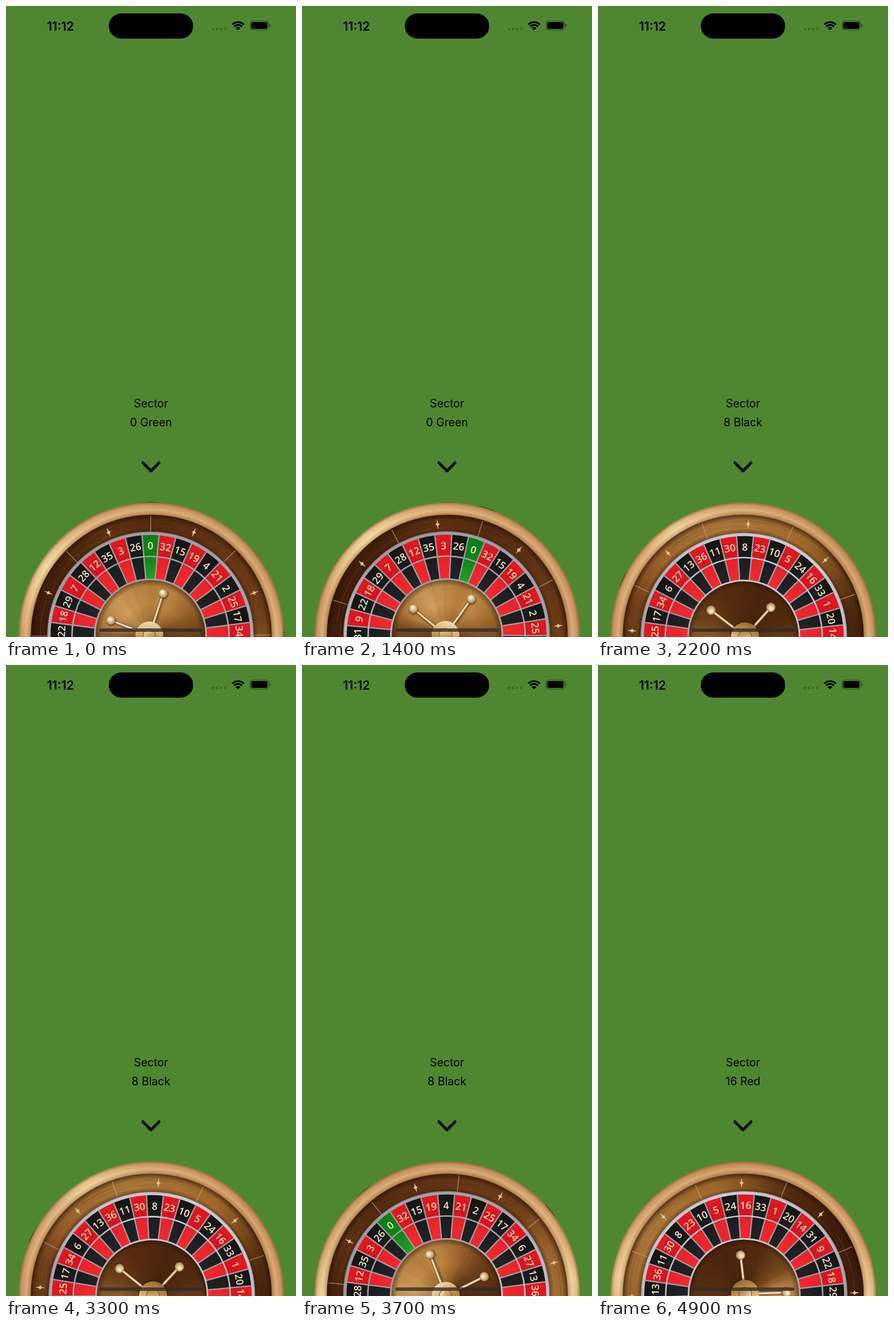
An HTML page with a canvas for the animation above (5 s loop, 508 px wide and 1102 px high).

```html
<!DOCTYPE html>
<html lang="en">
<head>
<meta charset="utf-8">
<title>Roulette</title>
<style>
  html, body { margin: 0; width: 100%; height: 100%; overflow: hidden; background: #4f8731; }
  canvas { display: block; width: 508px; height: 1102px; }
</style>
</head>
<body>
<canvas id="stage" width="508" height="1102"></canvas>
<script>
const ctx = document.getElementById('stage').getContext('2d');
const TAU = Math.PI * 2;
const LOOP = 5000, STEP = 100;
const CENTER = { x: 254.5, y: 1099.5 };
const ORDER = [0, 32, 15, 19, 4, 21, 2, 25, 17, 34, 6, 27, 13, 36, 11, 30, 8, 23, 10,
  5, 24, 16, 33, 1, 20, 14, 31, 9, 22, 18, 29, 7, 28, 12, 35, 3, 26];
const POCKET = TAU / ORDER.length;
const KNOBS = [[22, -73], [71.5, 17.2], [-21.5, 66], [-69.5, -26]];
const SPINS = [
  { start: 976, time: 950, from: 0, to: 925, label: '8 Black' },
  { start: 3280, time: 671, from: 205, to: 876.6, label: '16 Red' }
];

const rad = deg => deg * Math.PI / 180;

// cubic-bezier(.42, 0, .58, 1), solved by bisection
function easeInOut(x) {
  let lo = 0, hi = 1;
  for (let i = 0; i < 24; i++) {
    const s = (lo + hi) / 2, r = 1 - s;
    if (1.26 * r * r * s + 1.74 * r * s * s + s * s * s < x) lo = s; else hi = s;
  }
  return lo * lo * (3 - 2 * lo);
}

function stateAt(t) {
  let angle = 0, label = '0 Green';
  for (const s of SPINS) {
    if (t < s.start) break;
    const p = Math.min(1, (t - s.start) / s.time);
    angle = s.from + (s.to - s.from) * easeInOut(p);
    if (p === 1) label = s.label;
  }
  return { angle: rad(angle), label };
}

function addStops(g, stops) {
  stops.forEach(([at, color]) => g.addColorStop(at, color));
  return g;
}

// stops are given in degrees clockwise from the top
const conic = stops => addStops(ctx.createConicGradient(-Math.PI / 2, 0, 0),
  stops.map(([deg, color]) => [deg / 360, color]));
const radial = (x, y, r0, r1, stops) =>
  addStops(ctx.createRadialGradient(x, y, r0, x, y, r1), stops);

const paint = {
  rim: conic([[0, '#d2a06a'], [60, '#cf9a66'], [105, '#dcae78'], [122, '#f0d19a'], [150, '#d6a56e'],
    [200, '#cb955f'], [270, '#d5a36d'], [303, '#f5da a2'.replace(' ', '')], [330, '#ddb07a'], [360, '#d2a06a']]),
  rimShade: radial(0, 0, 209, 232.5, [[0, 'rgba(80,42,12,.7)'], [.16, 'rgba(120,70,30,.25)'],
    [.45, 'rgba(255,225,175,.22)'], [.75, 'rgba(150,95,50,.1)'], [1, 'rgba(110,65,25,.6)']]),
  wood: conic([[0, '#562c10'], [45, '#653615'], [80, '#713f18'], [102, '#97602a'], [145, '#ad7a3b'],
    [190, '#a0692b'], [212, '#764619'], [230, '#522b0e'], [265, '#3b1a09'], [310, '#48230c'],
    [335, '#5c3112'], [360, '#562c10']]),
  woodShade: radial(0, 0, 179, 211, [[0, 'rgba(30,12,2,.4)'], [.25, 'rgba(30,12,2,0)'],
    [.7, 'rgba(30,12,2,.05)'], [1, 'rgba(30,12,2,.6)']]),
  silver: conic([[0, '#a19ca1'], [80, '#aaa5aa'], [130, '#cac5cb'], [200, '#d0cbd2'],
    [260, '#bbb5bb'], [300, '#9f999e'], [360, '#a19ca1']]),
  red: radial(0, 0, 98, 176, [[0, '#f02a2e'], [.45, '#e8232a'], [.55, '#d8131d'], [1, '#e01922']]),
  black: radial(0, 0, 98, 176, [[0, '#222324'], [.5, '#1b1c1d'], [1, '#151515']]),
  green: radial(0, 0, 98, 176, [[0, '#24a02a'], [.5, '#118318'], [1, '#0f7d15']]),
  cone: conic([[0, '#b8823f'], [25, '#c18b48'], [55, '#a06a2f'], [85, '#70431a'], [120, '#5a2f12'],
    [180, '#4a240d'], [225, '#532b0f'], [262, '#7c4c20'], [280, '#b27d3f'], [315, '#cf9d5c'],
    [345, '#bf8a48'], [360, '#b8823f']]),
  coneShade: radial(0, 0, 20, 97, [[0, 'rgba(60,28,6,.25)'], [.45, 'rgba(60,28,6,0)'],
    [.85, 'rgba(50,22,4,.06)'], [1, 'rgba(40,16,2,.55)']]),
  hub: addStops(ctx.createLinearGradient(0, -25, 0, 25),
    [[0, '#f0dcb0'], [.35, '#dcb474'], [.65, '#bb8a48'], [1, '#9a6a32']]),
  cap: addStops(ctx.createLinearGradient(-6, -11, 6, 11),
    [[0, '#fff2cd'], [.4, '#d5ad6c'], [1, '#a87838']])
};

function random(seed) {
  return () => (seed = (seed * 16807) % 2147483647) / 2147483647;
}

function disc(x, y, r, fill) {
  ctx.beginPath();
  ctx.arc(x, y, r, 0, TAU);
  ctx.fillStyle = fill;
  ctx.fill();
}

function ring(inner, outer, fill) {
  ctx.beginPath();
  ctx.arc(0, 0, outer, 0, TAU);
  ctx.arc(0, 0, inner, 0, TAU, true);
  ctx.fillStyle = fill;
  ctx.fill();
}

function line(x1, y1, x2, y2, width, color) {
  ctx.beginPath();
  ctx.moveTo(x1, y1);
  ctx.lineTo(x2, y2);
  ctx.lineWidth = width;
  ctx.strokeStyle = color;
  ctx.stroke();
}

function pill(x, y, w, h, r, fill) {
  ctx.beginPath();
  ctx.roundRect(x, y, w, h, r);
  ctx.fillStyle = fill;
  ctx.fill();
}

function turned(angle, draw) {
  ctx.save();
  ctx.rotate(angle);
  draw();
  ctx.restore();
}

function grain() {
  const rnd = random(71);
  for (let i = 0; i < 46; i++) {
    const from = rnd() * TAU, r = 183 + rnd() * 25;
    ctx.beginPath();
    ctx.ellipse(0, 0, r, r + rnd() * 5 - 2.5, rnd() * TAU, from, from + .2 + rnd() * .4);
    ctx.lineWidth = .7 + rnd() * 1.2;
    ctx.strokeStyle = rnd() < .5 ? 'rgba(200,140,70,.1)' : 'rgba(40,16,2,.14)';
    ctx.stroke();
  }
}

function marker() {
  ctx.beginPath();
  ctx.moveTo(0, -204);
  ctx.lineTo(1.3, -197);
  ctx.lineTo(4, -195);
  ctx.lineTo(1.3, -193);
  ctx.lineTo(0, -186);
  ctx.lineTo(-1.3, -193);
  ctx.lineTo(-4, -195);
  ctx.lineTo(-1.3, -197);
  ctx.closePath();
  ctx.fillStyle = '#dcc096';
  ctx.fill();
}

function drawBowl() {
  // thin dark slivers beyond the rim
  for (const a of [0, 90]) turned(rad(a), () => {
    ctx.beginPath();
    ctx.ellipse(0, -231, 17, 2.2, 0, 0, TAU);
    ctx.fillStyle = '#29330f';
    ctx.fill();
  });
  disc(0, 0, 232.2, paint.rim);
  ring(209, 232.2, paint.rimShade);
  disc(0, 0, 210.5, paint.wood);
  grain();
  ring(179, 211, paint.woodShade);
  for (let i = 0; i < 8; i++) {
    turned(i * TAU / 8, () => line(-1, -209, -1, -181, 1.2, 'rgba(205,170,125,.75)'));
    turned((i + .5) * TAU / 8, marker);
  }
}

function drawPockets() {
  disc(0, 0, 181, paint.silver);
  ring(179.8, 181.6, 'rgba(60,45,45,.35)');
  ORDER.forEach((n, i) => {
    const mid = i * POCKET - Math.PI / 2;
    ctx.beginPath();
    ctx.arc(0, 0, 175, mid - POCKET / 2, mid + POCKET / 2);
    ctx.arc(0, 0, 98, mid + POCKET / 2, mid - POCKET / 2, true);
    ctx.closePath();
    ctx.fillStyle = n === 0 ? paint.green : i % 2 ? paint.red : paint.black;
    ctx.fill();
  });
  ORDER.forEach((n, i) => {
    turned((i + .5) * POCKET, () => line(0, -176, 0, -98, 2.3, paint.silver));
  });
  ring(136.2, 138.8, paint.silver);
  ring(95.5, 99, paint.silver);
  ctx.font = '600 17.5px "Open Sans", "Noto Sans", sans-serif';
  ctx.textAlign = 'center';
  ctx.textBaseline = 'alphabetic';
  ORDER.forEach((n, i) => turned(i * POCKET, () => {
    ctx.fillStyle = i > 0 && i % 2 ? '#fbd9b4' : '#f3e7c6';
    ctx.fillText(n, 0, -149.6);
  }));
}

function drawTurret() {
  disc(0, 0, 96, paint.cone);
  const rnd = random(19);
  for (let i = 0; i < 22; i++) {
    const a = rnd() * TAU;
    turned(a, () => line(0, -28, rnd() * 16 - 8, -93, .6 + rnd(), 'rgba(70,32,6,.09)'));
  }
  disc(0, 0, 96, paint.coneShade);

  const hubX = -2, hubY = .8;
  ctx.lineCap = 'round';
  for (const [x, y] of KNOBS) {
    line(hubX + 2, hubY + 2, x + 2, y + 2, 6, 'rgba(40,18,4,.3)');
    line(hubX, hubY, x, y, 5.4, '#6f4a23');
    line(hubX, hubY, x, y, 3.8, '#cdb083');
    line(hubX, hubY, x, y, 1.5, '#fff1d2');
  }
  ctx.lineCap = 'butt';
  for (const [x, y] of KNOBS) {
    disc(x + 1, y + 1.5, 8.8, 'rgba(50,24,6,.4)');
    const g = ctx.createRadialGradient(x - 2, y - 2.5, .5, x, y, 8.4);
    disc(x, y, 8.2, addStops(g, [[0, '#fffaea'], [.35, '#ead5ad'], [.75, '#c2a06c'], [1, '#8d6737']]));
  }
  ctx.save();
  ctx.translate(hubX, hubY);
  disc(1, 2, 26, 'rgba(50,24,6,.35)');
  disc(0, 0, 24.5, paint.hub);
  disc(0, 0, 12, 'rgba(100,62,22,.6)');
  disc(0, 0, 10.5, paint.cap);
  ctx.restore();
}

function drawWheel(angle) {
  ctx.save();
  ctx.translate(CENTER.x, CENTER.y);
  ctx.rotate(angle);
  drawBowl();
  ctx.translate(-1.4, -.8);
  drawPockets();
  drawTurret();
  ctx.restore();
}

function drawWifi() {
  ctx.save();
  ctx.translate(406.5, 42.6);
  ctx.strokeStyle = '#000';
  ctx.lineWidth = 3.1;
  for (const r of [9.6, 14.4]) {
    ctx.beginPath();
    ctx.arc(0, 0, r, rad(-135), rad(-45));
    ctx.stroke();
  }
  ctx.beginPath();
  ctx.moveTo(0, 0);
  ctx.arc(0, 0, 6, rad(-135), rad(-45));
  ctx.fillStyle = '#000';
  ctx.fill();
  ctx.restore();
}

function drawStatus() {
  ctx.fillStyle = '#000';
  ctx.textAlign = 'center';
  ctx.textBaseline = 'alphabetic';
  ctx.font = '600 21.5px Inter, sans-serif';
  ctx.fillText('11:12', 95.5, 43);
  pill(180, 13, 148, 44, 22, '#000');
  for (let i = 0; i < 4; i++) disc(362.7 + i * 7, 40, 2.1, 'rgba(0,0,0,.25)');
  drawWifi();
  ctx.beginPath();
  ctx.roundRect(427.5, 26, 32.5, 16, 5);
  ctx.lineWidth = 1.2;
  ctx.strokeStyle = 'rgba(0,0,0,.45)';
  ctx.stroke();
  pill(429.5, 28, 28.5, 12, 3.3, '#000');
  pill(461.4, 31.5, 2, 5.4, [0, 2, 2, 0], 'rgba(0,0,0,.5)');
}

function drawLabel(label) {
  ctx.fillStyle = '#000';
  ctx.font = '400 19.5px Inter, sans-serif';
  ctx.fillText('Sector', 254, 701);
  ctx.fillText(label, 254, 734);
  ctx.beginPath();
  ctx.moveTo(239.8, 797.6);
  ctx.lineTo(254, 812);
  ctx.lineTo(268.2, 797.6);
  ctx.lineWidth = 4.8;
  ctx.lineCap = ctx.lineJoin = 'round';
  ctx.strokeStyle = '#000';
  ctx.stroke();
  ctx.lineCap = 'butt';
  ctx.lineJoin = 'miter';
}

function draw(t) {
  const { angle, label } = stateAt(t);
  ctx.fillStyle = '#4f8731';
  ctx.fillRect(0, 0, 508, 1102);
  drawWheel(angle);
  drawStatus();
  drawLabel(label);
  pill(163.5, 1087, 181, 6, 3, 'rgba(48,44,42,.8)');
}

// The picture advances ten times a second
const began = performance.now();
let shown = -1;
function tick() {
  const t = Math.max(0, performance.now() - began) % LOOP;
  const step = Math.floor(t / STEP);
  if (step !== shown) draw((shown = step) * STEP);
  requestAnimationFrame(tick);
}
tick();
</script>
</body>
</html>
```
